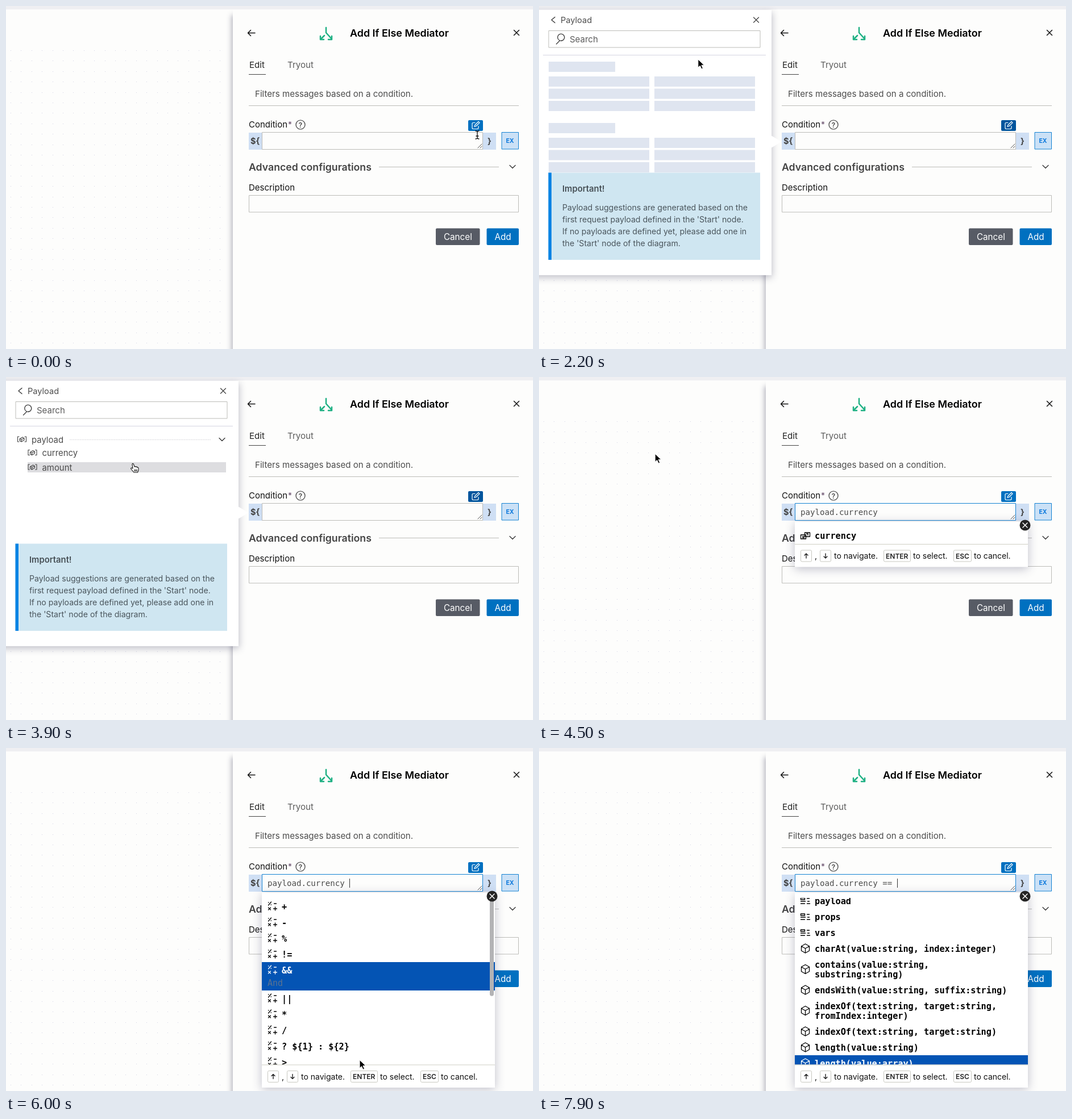
Write an HTML page with a canvas that moves like this. It is 927 by 604 pixels and loops after 8 s.

```html
<!DOCTYPE html>
<html>
<head>
<meta charset="utf-8">
<style>
html, body { margin: 0; width: 100%; height: 100%; overflow: hidden; background: #fdfdfc; }
canvas { display: block; }
</style>
</head>
<body>
<canvas id="stage" width="927" height="604"></canvas>
<script>
const ctx = document.getElementById('stage').getContext('2d');
const LOOP = 8000, STEP = 100;
const T = { open: 500, page: 1800, tree: 3300, close: 4400, hint: 4500, operators: 5700, functions: 7000 };
const SANS = 'Inter, sans-serif', MONO = '"DejaVu Sans Mono", monospace';
const PAPER = '#fdfdfc', INK = '#111', GREY = '#4c4c4c', LINE = '#bcbcb8', BLUE = '#0070c0', FOCUS = '#1482d2';

const OPERATORS = ['+', '-', '%', '!=', '&&', '||', '*', '/', '? ${1} : ${2}', '>', '<', '>=', '<=', '==', '!', '(', ')'];
const OPERATOR_NOTES = ['Add', 'Subtract', 'Modulo', 'Not equal', 'And', 'Or', 'Multiply', 'Divide', 'Conditional',
  'Greater than', 'Less than', 'Greater or equal', 'Less or equal', 'Equal'];
const FUNCTIONS = ['configs', 'headers', 'params', 'payload', 'props', 'vars',
  'charAt(value:string, index:integer)', 'contains(value:string,\nsubstring:string)',
  'endsWith(value:string, suffix:string)', 'indexOf(text:string, target:string,\nfromIndex:integer)',
  'indexOf(text:string, target:string)', 'length(value:string)', 'length(value:array)'];

// time, x, y, shape
const POINTER = [
  [0, 829, 227, 'beam'], [300, 827, 212, 'hand'], [600, 827, 212, 'arrow'],
  [1300, 293, 105, 'hand'], [1800, 287, 97, 'arrow'], [2300, 279, 94, 'arrow'],
  [3300, 279, 94, 'arrow'], [3800, 226, 160, 'hand'], [4000, 226, 160, 'hand'],
  [4200, 172, 136, 'hand'], [4400, 172, 130, 'arrow'], [5000, 606, 203, 'arrow'],
  [5400, 606, 203, 'arrow'], [6100, 623, 570, 'arrow'], [T.functions, 623, 570, 'arrow']];

const clamp = (v, lo, hi) => Math.min(hi, Math.max(lo, v));
const within = (t, from, to) => t >= from && t < to;

function text(s, x, y, size = 15, color = INK, weight = 400, family = SANS) {
  ctx.font = `${weight} ${size}px ${family}`;
  ctx.fillStyle = color;
  ctx.fillText(s, x, y);
}

function fill(x, y, w, h, color) {
  ctx.fillStyle = color;
  ctx.fillRect(x, y, w, h);
}

function box(x, y, w, h, radius, color, border) {
  ctx.beginPath();
  ctx.roundRect(x, y, w, h, radius);
  if (color) { ctx.fillStyle = color; ctx.fill(); }
  if (border) { ctx.strokeStyle = border; ctx.lineWidth = 1; ctx.stroke(); }
}

function shadowed(color, blur, dx, dy, draw) {
  ctx.save();
  Object.assign(ctx, { shadowColor: color, shadowBlur: blur, shadowOffsetX: dx, shadowOffsetY: dy });
  draw();
  ctx.restore();
}

function icon(d, x, y, color = '#333', width = 1.3, inside) {
  ctx.save();
  ctx.translate(x, y);
  const path = new Path2D(d);
  if (inside) { ctx.fillStyle = inside; ctx.fill(path); }
  ctx.strokeStyle = color;
  ctx.lineWidth = width;
  ctx.lineCap = ctx.lineJoin = 'round';
  ctx.stroke(path);
  ctx.restore();
}

const rule = (x1, x2, y, color = LINE) => fill(x1, y, x2 - x1, 1, color);
const cross = (x, y, r, color, width) => icon(`M${-r} ${-r}L${r} ${r}M${r} ${-r}L${-r} ${r}`, x, y, color, width);

function canvasArea() {
  fill(0, 0, 927, 604, PAPER);
  for (let y = 78; y < 604; y += 18.4)
    for (let x = 8; x < 392; x += 18.4) fill(Math.round(x), Math.round(y), 1, 1, '#d2d2e4');
  fill(0, 0, 927, 6, '#efeff2');
  shadowed('rgba(60,60,90,.4)', 9, -2, 6, () => fill(399, 10, 540, 620, PAPER));
  fill(399, 6, 528, 598, PAPER);
}

function form(t) {
  const popup = within(t, T.open, T.close);
  icon('M6 0H-6M-1.5-5L-6.5 0L-1.5 5', 432, 47.5, INK, 1.5);
  icon('M0-10V-1L9 9M-3 4L-9 10M-10 5V11H-4M10 5V11H4', 563, 48, '#20b184', 2.5);
  text('Add If Else Mediator', 605, 53.5, 17.9, '#000', 600);
  cross(898, 47, 4.5, INK, 1.5);

  text('Edit', 428, 109, 15.1, '#222');
  rule(427, 457, 120, '#444');
  text('Tryout', 495, 109, 15.1, '#5c5c5c');
  text('Filters messages based on a condition.', 438, 159.5, 15.1, GREY);
  rule(427, 902, 175);

  text('Condition', 427, 214);
  text('*', 496, 214, 14, '#644a68');
  icon('M8 0A8 8 0 1 1-8 0A8 8 0 1 1 8 0', 518, 209, '#333', 1.2);
  text('?', 514.7, 213.5, 12, '#333', 500);
  box(813, 201, 26, 19, 2, popup ? '#00559d' : BLUE);
  icon('M-1-5H-4Q-6-5-6-3V4Q-6 6-4 6H3Q5 6 5 4V1M-2 2L-1-1L5-7L7-5L1 1Z', 826, 210.5, '#fff', 1.2);

  fill(427, 223, 435, 30, '#cfdff4');
  text('${', 430, 243, 14.5, '#444', 700);
  text('}', 847, 243, 14.5, '#444', 700);
  const focused = within(t, T.open, T.page) || t >= T.close;
  box(450.5, 222.5, 388, 30, 0, PAPER, focused ? FOCUS : LINE);
  icon('M-6 3L1-4M-2 3L1 0', 836, 247, '#555', 1);
  box(872, 222.5, 29.5, 29.5, 0, '#cbe1f6', FOCUS);
  text('EX', 879.5, 241, 10.4, '#0b78dc', 700);

  text('Advanced configurations', 427, 290, 17.7, '#444', 600);
  rule(656, 867, 283);
  icon('M-5-2.5L0 2.5L5-2.5', 891, 283);
  text('Description', 427, 325);
  box(427.5, 333.5, 474, 29.5, 0, null, LINE);
  box(756, 391.5, 77.5, 29.5, 2, '#575b65');
  text('Cancel', 770, 412, 15.2, '#fff');
  box(845.5, 391.5, 56.5, 29.5, 2, BLUE);
  text('Add', 859.5, 412, 15.2, '#fff');
}

function fieldText(t) {
  const typed = t < T.close ? '' : 'payload.currency' + (t < T.operators ? '' : t < T.functions ? ' ' : ' == ');
  text(typed, 460, 242.5, 14.1, '#4a4a4a', 400, MONO);
  if (Math.floor((t - 5600) / 500) % 2 === 0 && typed)
    fill(Math.round(460 + ctx.measureText(typed).width), 230, 1, 16, '#333');
}

function card(label, y, hovered) {
  box(17, y + .5, 372, 57.5, 8, hovered ? '#dddde0' : '#fff', '#c4c4c0');
  text(label, 36.5, y + 34.5, 16.2, GREY);
  icon('M-3-5L3 0L-3 5', 363, y + 28.5, '#444', 1.2);
}

function dataPage(t) {
  text('Data', 17, 35, 15, '#222');
  rule(17, 50, 42, '#444');
  text('Functions', 87, 35, 15, '#5c5c5c');
  text('Configs', 194, 35, 15, '#5c5c5c');
  card('Payload', 67, t >= 1200);
  card('Variables', 135);
  card('Headers', 203);
  rule(17, 389, 278);
  card('Params', 295);
  card('Properties', 363);
}

function skeleton() {
  const shade = '#dfe5f0';
  for (const y of [98, 206]) {
    fill(17, y, 117, 18, shade);
    for (const dy of [26, 47.5, 69]) {
      fill(17, y + dy, 177, 18, shade);
      fill(203, y + dy, 177, 18, shade);
    }
  }
}

function leaf(label, x, y) {
  icon('M-5-5H-7.5V4H-5M5-5H7.5V4H5M-4-1L1-4L4-2V1L-1 4L-4 2ZM-4-1L-1 0L4-2M-1 0V4', x + 8, y, '#444', 1.1);
  text(label, x + 25, y + 5.5, 14.9, GREY);
}

function tree(t) {
  leaf('payload', 20, 110);
  for (let x = 112; x < 360; x += 3) rule(x, x + 2, 110, '#dadade');
  icon('M-5-2.5L0 2.5L5-2.5', 380, 110);
  if (t >= 3700) fill(38, t < 4100 ? 150 : 125, 349, 18, '#dddde0');
  leaf('currency', 38.5, 133.5);
  leaf('amount', 38.5, 159);
}

function payloadPage(t) {
  icon('M3-5L-3 0L3 5', 25, 24.5);
  text('Payload', 38, 30, 14.6, GREY);
  cross(382, 24.5, 4.5, '#444', 1.3);
  box(17, 43.5, 372, 29.5, 0, '#fff', LINE);
  icon('M-2 2L-8 8M-2.5 1.5A6 6 0 1 1 6-2A6 6 0 0 1-2.5 1.5', 38.5, 59, '#444', 1.4);
  text('Search', 54, 64, 15, '#5c5c5c');
  rule(7, 399, 86, '#d5d5e2');
  t < T.tree ? skeleton() : tree(t);

  fill(16.5, 293.5, 372.5, 153.5, '#cfe6f1');
  fill(16.5, 293.5, 5.5, 153.5, '#0783e4');
  text('Important!', 41, 326.5, 14.8, '#475056', 600);
  ['Payload suggestions are generated based on the', "first request payload defined in the 'Start' node.",
    'If no payloads are defined yet, please add one in', "the 'Start' node of the diagram."]
    .forEach((line, i) => text(line, 41, 360 + 21 * i, 14.1, '#4a555c'));
}

function popup(t) {
  shadowed('rgba(60,60,90,.32)', 12, 1, 4, () => fill(-20, 7, 429, 467, '#fff'));
  icon('M0-10L17 0L0 10Z', 409, 239, '#fff', 1, '#fff');
  t < T.page ? dataPage(t) : payloadPage(t);
}

const rowIcons = {
  field: (x, y, c) => icon('M-1-7H8V0H-1ZM-8-3H1V4H-8ZM-5 0H-2M-5 2H-2M2-5H5M4-3H5', x, y + 2, c, 1.3),
  operator: (x, y, c) => icon('M-7-2L-2-8M-7-7H-6.5M-2.5-3H-2M3-5H7M-7 2L-3 6M-3 2L-7 6M2 4H8M5 1V7', x, y, c, 1.3),
  struct: (x, y, c) => icon('M-8-5H-1V-2H-8ZM3-4H7M-8 1H0M4 1H7M-8 5H-1M3 5H8', x, y, c, 1.4),
  cube: (x, y, c) => icon('M0-8L7-4V4L0 8L-7 4V-4ZM-7-4L0 0L7-4M0 0V8', x, y, c, 1.3)
};

function keyCap(x, y, w, label) {
  box(x + .5, y - 10, w, 20, 2, '#fff', '#c8c8c0');
  text(label, x + 4, y + 4.5, 12, '#222', 600);
}

function footer(y) {
  rule(450, 860, y - 21, '#cfcfc4');
  keyCap(460, y, 19, '');
  icon('M0 4V-4M-3-1L0-4L3-1', 470, y, '#222', 1.4);
  text(',', 485, y + 5, 14);
  keyCap(494, y, 19, '');
  icon('M0-4V4M-3 1L0 4L3 1', 504, y, '#222', 1.4);
  text('to navigate.', 519, y + 5, 14);
  keyCap(606, y, 47, 'ENTER');
  text('to select.', 658, y + 5, 14);
  keyCap(729, y, 31, 'ESC');
  text('to cancel.', 765, y + 5, 14);
}

// Rows scroll so that the chosen one rests on the lower edge; lag holds the scroll back.
function dropdown({ items, kind, bottom, chosen = -1, note = '', lag = 0, bar }) {
  const top = 265, view = bottom - top;
  const heights = items.map((s, i) => 28 + (s.includes('\n') ? 17 : 0) + (i === chosen ? 22 : 0));
  const sum = n => heights.slice(0, n).reduce((a, b) => a + b, 0);
  const scroll = Math.max(0, sum(chosen + 1) - view - lag);

  shadowed('rgba(50,50,90,.3)', 16, 0, 3, () => fill(450, 255, 410, bottom - 255 + 40.5, '#fff'));
  ctx.save();
  ctx.beginPath();
  ctx.rect(450, top - 1, 410, view + 1);
  ctx.clip();
  let y = top - scroll;
  items.forEach((item, i) => {
    const active = i === chosen, color = active ? '#fff' : '#000';
    const lines = item.split('\n'), mid = y + 14 + (lines.length - 1) * 8.5;
    if (active) fill(450, y, 410, heights[i], '#0454b4');
    rowIcons[kind(i)](468.5, mid, color);
    lines.forEach((s, n) => text(s, 485, y + 19.5 + 17.5 * n, 15.2, color, 700, MONO));
    if (active) text(note, 460, y + heights[i] - 8.5, 15, '#5c7391', 400, MONO);
    y += heights[i];
  });
  if (bar) {
    const scale = view / sum(items.length);
    box(851, top + scroll * scale, 7, view * scale, 3.5, '#b3b3b5');
  }
  ctx.restore();
  footer(bottom + 21);
  ctx.beginPath();
  ctx.arc(855, 261, 9.5, 0, 7);
  ctx.fillStyle = '#242424';
  ctx.fill();
  cross(855, 261, 4, '#fff', 1.5);
}

function suggestions(t) {
  if (t < T.operators) {
    dropdown({ items: ['currency'], kind: () => 'field', bottom: 294 });
  } else if (t < T.functions) {
    const chosen = clamp(Math.floor((t - 5800) / 50), 0, 13);
    dropdown({ items: OPERATORS, kind: () => 'operator', bottom: 557.5, chosen, note: OPERATOR_NOTES[chosen], bar: true });
  } else {
    const chosen = clamp(Math.floor((t - 7150) / 60), 0, 12);
    dropdown({ items: FUNCTIONS, kind: i => i < 6 ? 'struct' : 'cube', bottom: 557.5, chosen, note: 'Expression', lag: 33.5 });
  }
}

const pointers = {
  arrow: (x, y) => icon('M0 0V14L3.5 11L6 16.5L8.5 15.5L6 10H10.5Z', x, y, '#fff', 1, '#000'),
  hand: (x, y) => icon('M-4-6Q-4-8-2.5-7.5Q-1.5-7-1-5L0-2Q2-3 3-1.5Q5-2.5 5.5-.5Q7-1 7 1V4L5.5 8H-1L-6 2Q-7 0-5 0L-3 1ZM0 3V6M2 3V6M4 3V6', x, y, '#111', 1.1, '#fff'),
  beam: (x, y) => icon('M-3-7Q0-7 0-5Q0-7 3-7M0-5V5M-3 7Q0 7 0 5Q0 7 3 7M-2 2H2', x, y, '#111', 1.3)
};

function pointer(t) {
  const next = POINTER.findIndex(k => k[0] > t);
  if (next < 1) return;
  const [t0, x0, y0, shape] = POINTER[next - 1], [t1, x1, y1] = POINTER[next];
  const u = (t - t0) / (t1 - t0), e = u * u * (3 - 2 * u);
  pointers[shape](x0 + (x1 - x0) * e, y0 + (y1 - y0) * e);
}

function frame(now) {
  const t = Math.floor(now % LOOP / STEP) * STEP;
  canvasArea();
  form(t);
  fieldText(t);
  if (within(t, T.open, T.close)) popup(t);
  if (t >= T.hint) suggestions(t);
  pointer(t);
  requestAnimationFrame(frame);
}
requestAnimationFrame(frame);
</script>
</body>
</html>
```
